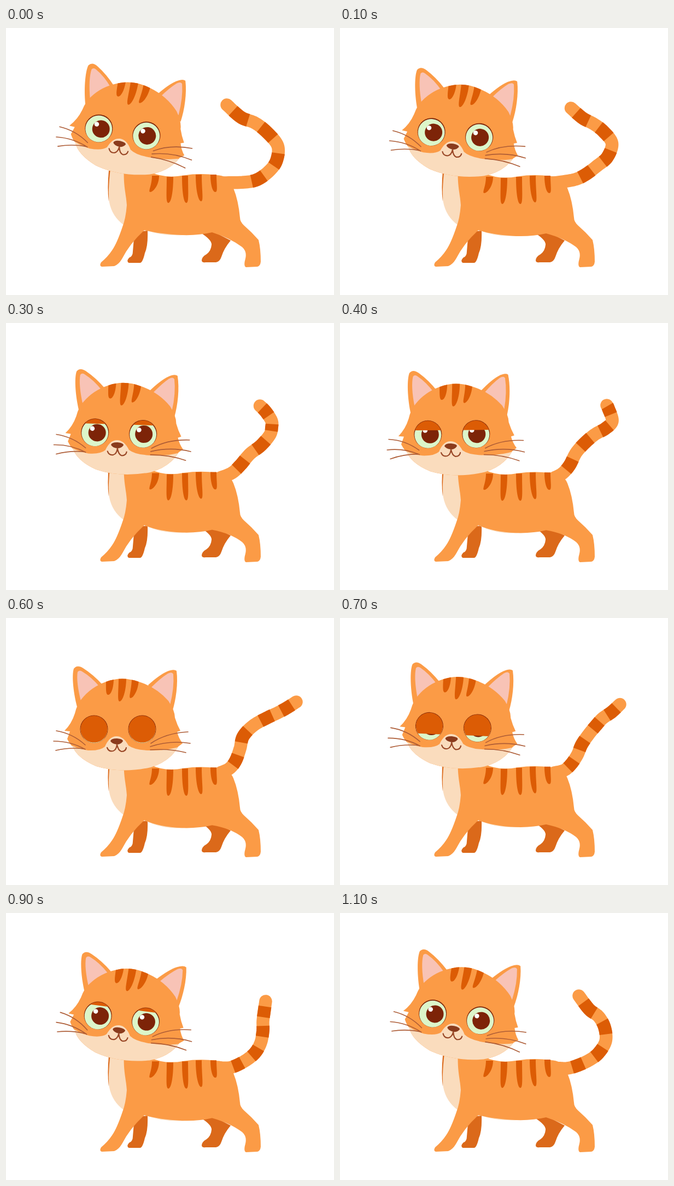
An HTML page that plays this animation: 600x490 px, repeating every 1.2 s.

```html
<!DOCTYPE html>
<html lang="en">
<head>
<meta charset="utf-8">
<title>Orange cat</title>
<style>
  html, body { margin: 0; width: 100%; height: 100%; overflow: hidden; background: #fff; }
  svg { display: block; width: 600px; height: 490px; }
</style>
</head>
<body>
<svg id="cat" viewBox="0 0 600 490"></svg>
<script>
const FUR = '#fb9b46', STRIPE = '#dc5c05', SHADE = '#db691a', CREAM = '#fadcbd',
      PINK = '#f8c3b6', DARK = '#7d2408', EYE = '#dcf6ca', WHISKER = '#ad5c36';
const STEP = 100, STEPS = 12;
const KEYS = [0, 2, 4, 6, 8, 9, 11];

// nose x, nose y, head tilt, lid closure, left ear, right ear, whisker lift
const POSES = [
  [207, 213, 8.5, 0, -1, -8, -5],
  [204, 223, 3.9, 0, 4, -3, 0],
  [202, 227, -0.4, .35, -4, -4, -6],
  [202, 227, 0, .995, 0, 0, 0],
  [205, 219, 4.6, .58, -3, -6, -6],
  [206, 216, 7.2, .13, 6, -2, 0],
  [207, 213, 8.2, 0, 3, -5, -4]
];

// tail centre line: plain and striped bands alternate, the tip comes last
const TAILS = [
  '436,283 460,278 482,262 495,243 497,216 477,191 455,174 430,164 404,141',
  '420,274 438,260 460,243 483,231 498,207 487,189 473,178 458,167 441,153',
  '407,276 420,261 432,238 449,219 467,204 485,194 498,180 491,157 488,151',
  '409,276 420,262 428,240 434,217 453,197 478,183 495,175 512,166 531,154',
  '411,283 425,275 440,263 450,248 457,230 461,209 466,193 482,179 493,163',
  '408,284 423,279 441,269 456,256 466,238 470,216 470,199 472,183 475,162',
  '415,285 434,280 456,270 473,257 486,235 484,210 473,190 456,177 437,152'
].map(s => s.split(/[ ,]/).map(Number));

function blend(rows, step) {
  const i = KEYS.findLastIndex(k => k <= step), j = (i + 1) % KEYS.length;
  const f = (step - KEYS[i]) / ((KEYS[j] || STEPS) - KEYS[i]);
  return rows[i].map((v, n) => v + (rows[j][n] - v) * f);
}

const shape = (d, fill) => `<path d="${d}" fill="${fill}"/>`;
const line = (d, color, width, cap = 'round') =>
  `<path d="${d}" fill="none" stroke="${color}" stroke-width="${width}" stroke-linecap="${cap}" stroke-linejoin="round"/>`;
const disc = (x, y, r, fill) => `<circle cx="${x}" cy="${y}" r="${r}" fill="${fill}"/>`;
const turn = (angle, x, y, inner) => `<g transform="rotate(${angle} ${x} ${y})">${inner}</g>`;

// tapered marking from the edge (x1..x2, y) down to (x, bottom)
function marking(x1, x2, y, x, bottom) {
  const mid = y + (bottom - y) * .6;
  return shape(`M${x1} ${y}C${x1} ${mid} ${x - 5} ${bottom} ${x} ${bottom}S${x2} ${mid} ${x2} ${y}Z`, STRIPE);
}

function spline(pts, u) {
  const last = pts.length - 1, i = Math.min(Math.floor(u), last - 1), t = u - i;
  const [a, b, c, d] = [-1, 0, 1, 2].map(o => pts[Math.max(0, Math.min(last, i + o))]);
  return [0, 1].map(k => (b[k] + .5 * t * (c[k] - a[k] + t * (2 * a[k] - 5 * b[k] + 4 * c[k] - d[k]
    + t * (3 * (b[k] - c[k]) + d[k] - a[k])))).toFixed(2)).join(' ');
}

function tail(flat) {
  const pts = [[392, 284]];
  for (let i = 0; i < flat.length; i += 2) pts.push([flat[i], flat[i + 1]]);
  const run = (from, to) => {
    const n = Math.round((to - from) * 10);
    return 'M' + Array.from({ length: n + 1 }, (_, k) => spline(pts, from + k / 10)).join('L');
  };
  return line(run(0, 9), FUR, 23.5)
    + [2, 4, 6, 8].map(u => line(run(u - .5, u + .5), STRIPE, 23.8, 'butt')).join('');
}

function body(b) {
  const legs = shape('M236 374L259 372Q260 400 254 413Q250 431 245 431L225 431Q219 428 226 421Q232 419 232 410Q233 393 236 374Z', SHADE)
    + shape('M355 375Q377 389 376 398Q375 409 367 415Q358 420 358 427Q359 431 365 430L384 430Q391 429 394 420Q399 404 411 390L380 374Z', SHADE);
  const chest = shape('M188 262Q185 295 188 318L194 262Z', SHADE)
    + shape('M191 258Q186 300 189 320Q194 346 216 362L226 320V258Z', CREAM)
    + shape(`M248 368Q280 ${382 + b} 325 ${380 + b}V365Z`, CREAM);
  const trunk = shape(`M216 255C214 290 220 305 221 325Q219 350 213 365Q203 395 194 408
    Q186 420 174 430Q170 437 176 438L198 437Q206 434 212 424Q226 396 253 371
    Q280 ${378 + b} 322 ${380 + b}Q352 ${381 + b} 377 ${375 + b}Q411 386 432 402Q441 410 438 423
    Q434 437 439 439L460 438Q465 437 466 429Q466 405 462 389Q450 375 435 362Q428 355 428 348
    Q425 316 416 294Q408 ${270 + b} 385 ${270 + b}Q355 ${266 + b} 325 ${270.5 + b}
    Q290 ${277 + b} 264 ${264 + b}Z`, FUR);
  const marks = [[267, 280, 271, 264, 301], [294, 306, 273, 297, 321], [322, 333, 271, 330, 321],
    [347, 358, 269, 357, 318], [374, 385, 269, 383, 301]]
    .map(([x1, x2, y, x, end]) => marking(x1, x2, y + b, x, end + b)).join('');
  return legs + chest + trunk + marks;
}

function eye(x, pupil, lid) {
  const r = 24.7, y = r * (2 * lid - 1), w = Math.sqrt(r * r - y * y);
  const cover = lid ? shape(`M${-w} ${y}A${r} ${r} 0 ${y > 0 ? 1 : 0} 1 ${w} ${y}Z`, STRIPE) : '';
  return `<g transform="translate(${x} 204)">${disc(0, 0, 25.5, DARK)}${disc(0, .9, 24.5, EYE)}
    ${disc(pupil, .5, 16, DARK)}${disc(pupil - 9, -7, 4.3, '#fff')}${cover}</g>`;
}

const HEAD = `M183 117Q212 106 243 117Q275 127 297 152Q309 170 309 183Q313 196 319 207L313 209
  Q316 221 323 230L315 236Q300 263 265 274Q210 286 165 272Q130 257 122 236Q117 232 112 222
  L117 208L107 207Q120 194 126 175Q130 158 138 149Q155 127 183 117Z`;

function head([x, y, tilt, lid, earL, earR, lift]) {
  const ears = turn(-earL, 152, 148,
      shape('M132 170C123 140 120 105 124 93Q130 85 141 92Q160 104 177 123L160 165Z', FUR)
      + shape('M138 156C131 130 129 110 131 99Q134 95 139 98Q156 108 171 126L155 155Z', PINK))
    + turn(earR, 288, 148,
      shape('M260 123Q281 104 295 98Q307 93 312 97C315 120 311 150 304 172L280 160Z', FUR)
      + shape('M265 128Q283 110 296 102Q304 98 306 103Q308 128 300 160L280 155Z', PINK));
  const face = shape(HEAD, FUR)
    + `<g clip-path="url(#skull)">
      ${shape('M100 222Q125 240 150 243Q172 244 181 236Q189 217 202 217Q215 217 224 234Q236 243 265 243Q300 244 330 232V300H100Z', CREAM)}
      ${marking(183, 197, 111, 187, 141)}${marking(206, 220, 109, 208, 153)}${marking(230, 243, 110, 228, 147)}</g>`;
  const mouth = shape('M191 226Q192 221 203 221Q214 222 214 226Q210 232 203 232Q194 231 191 226Z', '#8a3b1d')
    + line('M185 238Q188 246 196 244Q202 242 203 232Q205 243 211 245Q219 245 220 238', '#9a4827', 2.2);
  const whiskers = turn(lift, 145, 237,
      line('M92 207Q122 212 145 233M87 226Q118 226 145 241M91 243Q116 237 143 240', WHISKER, 1.6))
    + turn(-lift, 264, 237,
      line('M265 230Q293 211 333 209M264 236Q300 224 337 230M264 242Q298 239 329 247', WHISKER, 1.6));
  return `<g transform="translate(${x - 202} ${y - 227}) rotate(${tilt} 202 227)">
    <clipPath id="skull"><path d="${HEAD}"/></clipPath>
    ${ears}${face}${eye(161, 4, lid)}${eye(249, 1.5, lid)}${mouth}${whiskers}</g>`;
}

const stage = document.getElementById('cat');
let shown = -1;

function draw() {
  const step = Math.floor(performance.now() / STEP) % STEPS;
  if (step !== shown) {
    shown = step;
    const pose = blend(POSES, step);
    stage.innerHTML = tail(blend(TAILS, step)) + body((pose[1] - 213) * .38) + head(pose);
  }
  requestAnimationFrame(draw);
}
draw();
</script>
</body>
</html>
```
